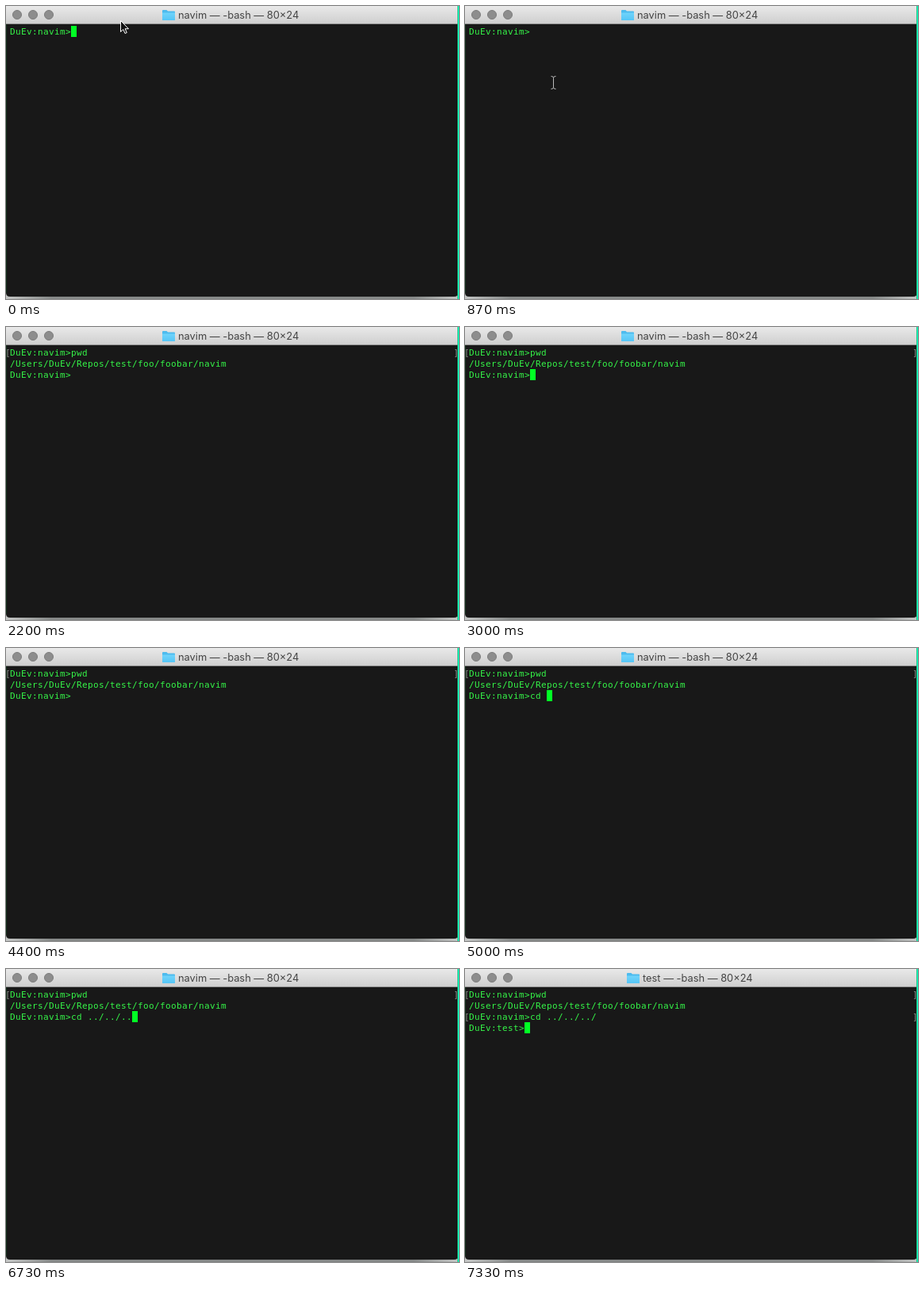
Recreate the animation shown at these times as an HTML page. Size 571 px wide and 369 px high, loop 8000 ms.

```html
<!DOCTYPE html>
<html lang="en">
<head>
<meta charset="utf-8">
<title>Terminal</title>
<style>
  html, body { margin: 0; width: 100%; height: 100%; overflow: hidden; background: #c4c6c5; }
  svg { display: block; }
  #title { font: 12.85px Inter, "Open Sans", sans-serif; fill: #444; }
  #screen text { font: 11px "DejaVu Sans Mono", monospace; letter-spacing: .378px; fill: #35f548; white-space: pre; }
  #screen .mark { fill: #8a8f8a; }
</style>
</head>
<body>
<svg width="571" height="369" viewBox="0 0 571 369">
  <defs>
    <linearGradient id="bar" x2="0" y2="1">
      <stop stop-color="#e9e9e9"/><stop offset="1" stop-color="#cfcfcf"/>
    </linearGradient>
    <linearGradient id="blue" x2="0" y2="1">
      <stop stop-color="#70d4fb"/><stop offset="1" stop-color="#55c5f6"/>
    </linearGradient>
    <linearGradient id="shadow">
      <stop stop-color="#c4c6c5"/><stop offset=".1" stop-color="#858887"/>
      <stop offset=".9" stop-color="#858887"/><stop offset="1" stop-color="#c4c6c5"/>
    </linearGradient>
  </defs>
  <rect y="365" width="571" height="4" fill="url(#shadow)"/>
  <path d="M0 20H570V361Q570 366 565 366H5Q0 366 0 361Z" fill="#181818"/>
  <path d="M.5 23V361" stroke="#12301a"/>
  <rect width="570" height="22" fill="url(#bar)"/>
  <path d="M0 22.5H570" stroke="#8f8f8f"/>
  <path d="M569.5 0V369" stroke="#22c583"/>
  <path d="M570.5 0V369" stroke="#0cffc8"/>
  <g fill="#8d8d8d" stroke="#7c7c7c">
    <circle cx="14" cy="11" r="5.5"/><circle cx="34" cy="11" r="5.5"/><circle cx="54" cy="11" r="5.5"/>
  </g>
  <g id="heading">
    <path d="M0 6Q0 5 1 5H5.5L7 6.5H15Q16 6.5 16 7.5V17Q16 18 15 18H1Q0 18 0 17Z" fill="#4dbbee"/>
    <path d="M0 8.5H16V17Q16 18 15 18H1Q0 18 0 17Z" fill="url(#blue)"/>
    <text id="title" x="20" y="16"></text>
  </g>
  <g id="screen"></g>
  <rect id="caret" width="7" height="14" fill="#00ff24"/>
  <path id="arrow" d="M0 0V14L3.3 11L5.5 16L7.8 15L5.6 10.2H10Z" fill="#111" stroke="#fff"/>
  <path id="beam" d="M-3 -8Q0 -8 0 -6V6Q0 8 -3 8M3 -8Q0 -8 0 -6M0 6Q0 8 3 8" fill="none" stroke="#bbb"/>
</svg>
<script>
const LOOP = 8000, CELL = 7, ROW = 14, LEFT = 5, TOP = 25;
const USER = "DuEv", HOME = "navim";
const $ = id => document.getElementById(id);
const prompt = dir => `${USER}:${dir}>`;

const PWD_KEYS = [1330, 1600, 1670];
const CD_KEYS = [4530, 4600, 4800, 5270, 5470, 5600, 5870, 6000, 6200, 6530, 6670, 6800];
const PWD_ENTER = 2200, CD_ENTER = 7330;
const CARET_OFF = [[470, 930], [2200, 3000], [3400, 3930], [4400, 4530]];
const MOVES = [270, 330, 400, 470], MOUSE_HIDE = 1330;

const typed = (text, keys, t) => text.slice(0, keys.filter(k => k <= t).length);

function linesAt(t) {
  const lines = [prompt(HOME) + typed("pwd", PWD_KEYS, t)];
  if (t >= PWD_ENTER)
    lines.push(`/Users/${USER}/Repos/test/foo/foobar/${HOME}`,
               prompt(HOME) + typed("cd ../../../", CD_KEYS, t));
  if (t >= CD_ENTER) lines.push(prompt("test"));
  return lines;
}

function place(el, x, y, shown = true) {
  el.setAttribute("transform", `translate(${x} ${y})`);
  el.style.display = shown ? "" : "none";
}

let last = "";
function draw(t) {
  const lines = linesAt(t), end = lines.length - 1;
  const key = lines.join("\n");
  if (key !== last) {
    last = key;
    const text = (s, x, i, cls = "") =>
      `<text class="${cls}" x="${x}" y="${TOP + ROW * i + 11}">${s.replace(">", "&gt;")}</text>`;
    $("screen").innerHTML = lines.map((s, i) => {
      const entered = i < end && s.includes(">");
      return text(s, LEFT, i) + (entered ? text("[", -1, i, "mark") + text("]", 564, i, "mark") : "");
    }).join("");
    const moved = t >= CD_ENTER;
    $("title").textContent = `${moved ? "test" : HOME} — -bash — 80×24`;
    place($("heading"), moved ? 204 : 197, 0);
  }
  place($("caret"), LEFT + CELL * lines[end].length, TOP + ROW * end,
        !CARET_OFF.some(([a, b]) => t >= a && t < b));

  // The pointer turns into a text beam once it is over the terminal.
  const step = MOVES.filter(m => m <= t).length / MOVES.length;
  const visible = t < MOUSE_HIDE;
  place($("arrow"), 144.5, 18.5, visible && step === 0);
  place($("beam"), 145.5 - 34 * step, 26.5 + 70 * step, visible && step > 0);
}

const start = performance.now();
function frame() {
  draw((performance.now() - start) % LOOP);
  requestAnimationFrame(frame);
}
frame();
</script>
</body>
</html>
```
